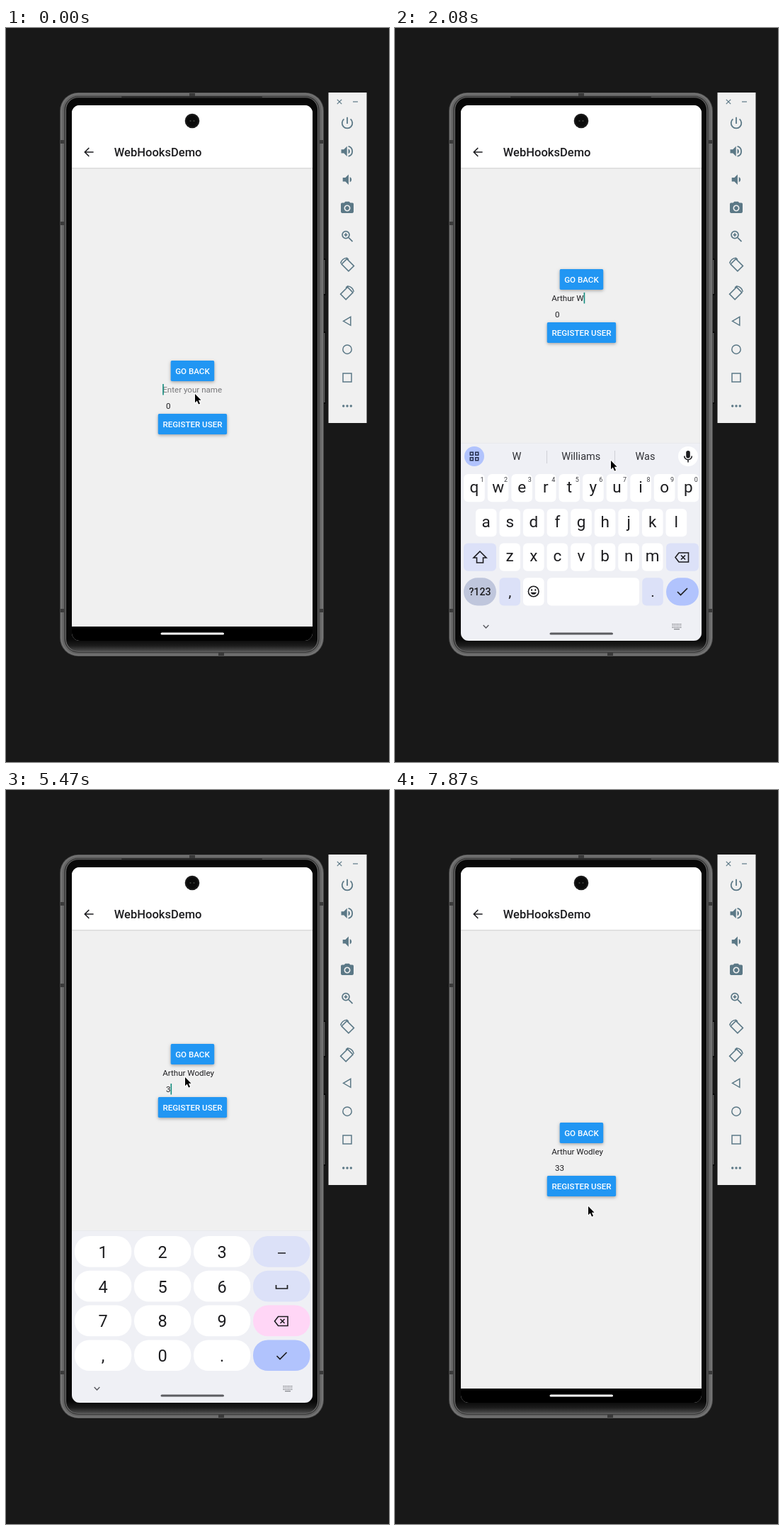
An HTML page with a canvas that plays this animation: 541x1035 px, repeating every 8 s.

```html
<!DOCTYPE html>
<html lang="en">
<head>
<meta charset="utf-8">
<title>WebHooksDemo</title>
<style>
html, body { margin: 0; width: 100%; height: 100%; overflow: hidden; background: #181818; }
canvas { display: block; width: 541px; height: 1035px; }
</style>
</head>
<body>
<canvas id="stage" width="541" height="1035"></canvas>
<script>
const ctx = document.getElementById('stage').getContext('2d');
const LOOP = 8000;
const NAME = 'Arthur Wodley';
const INK = '#1d1d20', SLATE = '#5b7886', KEY_TINT = '#dce1f8', ACCENT = '#b1c3fd';

// Held keys: [time, value...]
const POINTER = [
  [0, 267, 516], [140, 268, 518], [290, 282, 552], [440, 300, 597], [590, 305, 610],
  [3270, 304, 600], [3420, 290, 560], [3570, 265, 501], [3690, 257, 455], [3840, 254, 420],
  [3980, 253, 405], [6220, 256, 410], [6370, 268, 440], [6520, 308, 500], [6670, 385, 771],
  [6820, 390, 806], [6970, 393, 817], [7120, 392, 800], [7270, 380, 770], [7420, 345, 700],
  [7570, 308, 640], [7720, 282, 602], [7870, 273, 587]
];
const KEYBOARD_DROP = [[0, 300], [140, 220], [290, 70], [440, 10], [590, 0], [7270, 40], [7420, 150], [7570, 300]];
const FORM_SHIFT = [[0, 0], [290, -129], [4280, -111], [7420, 0]];
const AGE = [[0, '0'], [4730, ''], [5470, '3'], [5620, '33']];
const CARET = [[0, true], [3420, false], [3840, true], [6220, false], [6670, true], [7120, false]];
const HINTS = [
  [], ['A', 'Are', 'And'], ['Ar', 'Are', 'Art'], ['Art', 'Arts', 'Article'], ['Arth', 'Arthur', 'Art'],
  ['Arthu', 'Arthur', 'Art'], ['Arthur', 'Arthurs', 'Author'], ['is', 'and', 'was'], ['W', 'Williams', 'Was'],
  ['Wo', 'Would', 'Work'], ['Wod', 'Wood', 'Words'], ['Wodl', 'World', 'Would'], ['Wodle', 'Would', 'Whole'],
  ['Wodle', 'Wodley', 'Whole']
];

const held = (track, t) => track.filter(k => k[0] <= t).pop().slice(1);

function text(str, x, y, size, color = INK, align = 'left', weight = 400) {
  ctx.font = `${weight} ${size}px Roboto, sans-serif`;
  ctx.textAlign = align;
  ctx.fillStyle = color;
  ctx.fillText(str, x, y);
}

function box(x, y, w, h, r, color) {
  ctx.fillStyle = color;
  ctx.beginPath();
  ctx.roundRect(x, y, w, h, r);
  ctx.fill();
}

const disc = (x, y, r, color) => box(x - r, y - r, 2 * r, 2 * r, r, color);

// Path drawn around its own centre; width 0 means filled.
function icon(path, x, y, color, width = 0, turn = 0, flip = 1) {
  ctx.save();
  ctx.translate(x, y);
  ctx.scale(flip, 1);
  ctx.rotate(turn);
  const p = new Path2D(path);
  if (width) {
    ctx.strokeStyle = color;
    ctx.lineWidth = width;
    ctx.stroke(p);
  } else {
    ctx.fillStyle = color;
    ctx.fill(p);
  }
  ctx.restore();
}

const CHECK = 'M-7 0L-2.5 4.5L7 -5';
const circlePath = (r, x = 0, y = 0) => `M${x - r} ${y}a${r} ${r} 0 1 0 ${2 * r} 0a${r} ${r} 0 1 0 ${-2 * r} 0Z`;

function drawPhone() {
  ctx.fillStyle = '#181818';
  ctx.fillRect(0, 0, 541, 1035);
  for (const [y, h] of [[325, 52], [428, 102]]) {
    box(448, y, 3.5, h, 1, '#050505');
    box(449, y + 2, 1.5, h - 4, 0, '#5a5a5a');
  }
  const bezel = ctx.createLinearGradient(0, 862, 0, 880);
  bezel.addColorStop(0, '#080808');
  bezel.addColorStop(.5, '#1c1c1c');
  bezel.addColorStop(1, '#565656');
  const layers = [[0, '#484848'], [1, '#747474'], [3.5, '#646464'], [6.5, '#2c2c2c'], [7.8, '#6c6c6c'], [9, bezel]];
  for (const [d, color] of layers) box(76 + d, 91 + d * .8, 373 - 2 * d, 795 - 1.6 * d, 26 - d, color);
  for (const y of [160, 275, 821]) box(77, y - 2, 5, 5, 0, '#3a3a3a');
  for (const y of [160, 821]) box(443, y - 2, 5, 5, 0, '#3a3a3a');
  box(259, 92, 8, 4, 0, '#3a3a3a');
  box(300, 881, 8, 4, 0, '#3a3a3a');
  box(163, 96, 199, 2, 1, '#2a2a2a');
}

function drawToolbar() {
  box(455.5, 91, 54, 466, 0, '#f0f0f0');
  icon('M-3.2 -3.2L3.2 3.2M3.2 -3.2L-3.2 3.2', 471, 104, SLATE, 1.2);
  icon('M-3.5 0H3.5', 493.5, 104, SLATE, 1.2);
  const at = (i, path, width, turn, flip) => icon(path, 482, 134 + i * 39.9, SLATE, width, turn, flip);
  at(0, 'M0 -8.3V1M-4.6 -5.6A7.3 7.3 0 1 0 4.6 -5.6', 1.8);
  at(1, 'M-8.5 -2.7H-4.8L-.3 -7.2V7.2L-4.8 2.7H-8.5ZM1.5 -3.7A4 4 0 0 1 1.5 3.7Z');
  at(1, 'M1.6 -7A7.2 7.2 0 0 1 1.6 7', 1.8);
  at(2, 'M-6.3 -2.7H-2.6L1.9 -7.2V7.2L-2.6 2.7H-6.3ZM3.7 -3.7A4 4 0 0 1 3.7 3.7Z');
  at(3, 'M-2.7 -9H2.7L4.4 -7.2H7.3Q9 -7.2 9 -5.4V5.4Q9 7.2 7.3 7.2H-7.3Q-9 7.2 -9 5.4V-5.4Q-9 -7.2 -7.3 -7.2H-4.4Z');
  icon(circlePath(3.7), 482, 254, '#f0f0f0', 1.6);
  at(4, circlePath(5, -2, -2) + 'M1.8 1.8L7.5 7.5M-4.4 -2H.4M-2 -4.4V.4', 1.7);
  for (const [i, flip] of [[5, 1], [6, -1]]) {
    at(i, 'M-5.3 -6H5.3V8H-5.3Z', 1.6, -Math.PI / 4, flip);
    at(i, 'M-9.3 -1.5A9.3 9.3 0 0 1 -.5 -9.3L2 -7', 1.5, 0, flip);
  }
  at(7, 'M-5.5 0L4.8 -6V6Z', 1.5);
  at(8, circlePath(6.2), 1.5);
  at(9, 'M-6 -6H6V6H-6Z', 1.5);
  for (const dx of [-5.3, 0, 5.3]) disc(482 + dx, 533, 1.7, SLATE);
}

function button(label, x, y, w) {
  ctx.save();
  ctx.shadowColor = 'rgba(0,0,0,.32)';
  ctx.shadowBlur = 4;
  ctx.shadowOffsetY = 1.5;
  box(x, y, w, 29, 1.7, '#2196f3');
  ctx.restore();
  text(label, x + w / 2, y + 18.7, 11.6, '#fff', 'center', 500);
}

function field(value, hint, x, baseline, caret) {
  text(value || hint, x, baseline, 11.6, value ? INK : '#77777a');
  if (caret) box(x + (value ? ctx.measureText(value).width : 0), baseline - 12, 1.6, 15.5, 0, '#128c7e');
}

function drawApp(t, typed) {
  ctx.fillStyle = '#f0f0f0';
  ctx.fillRect(93, 109, 340, 755);
  ctx.fillStyle = '#dcdcdc';
  ctx.fillRect(93, 197, 340, 1.5);
  ctx.fillStyle = '#fff';
  ctx.fillRect(93, 109, 340, 88);
  icon('M6.6 0H-6M.3 -6L-5.7 0L.3 6', 117, 175, INK, 1.6);
  text('WebHooksDemo', 152.8, 181, 16.55, INK, 'left', 500);
  disc(263, 131, 10.3, '#1a1a1a');
  disc(263, 131, 8, '#0b0b0b');
  for (const x of [260.5, 265.5]) disc(x, 131, 1.1, '#3c403c');

  const caret = held(CARET, t)[0], onAge = t >= 4280;
  ctx.save();
  ctx.translate(0, held(FORM_SHIFT, t)[0]);
  button('GO BACK', 232.7, 469, 61.5);
  field(typed, 'Enter your name', 221.2, 514, caret && !onAge);
  field(held(AGE, t)[0], 'Enter your age', 226, 537, caret && onAge);
  button('REGISTER USER', 214.8, 544, 97.3);
  ctx.restore();

  ctx.fillStyle = '#000';
  ctx.fillRect(93, 844, 340, 20);
}

function deleteIcon(x, y) {
  icon('M-9.5 0L-4.5 -6.5H9V6.5H-4.5ZM-1.5 -3L4.5 3M4.5 -3L-1.5 3', x, y, INK, 1.6);
}

function drawBase(top) {
  ctx.fillStyle = '#eff0f5';
  ctx.fillRect(93, top, 340, 900 - top);
  ctx.fillStyle = '#e8e9ed';
  ctx.fillRect(93, top, 340, 1);
  icon('M-3.8 -2L0 2L3.8 -2', 128.5, 844, '#55565c', 1.3);
  for (let r = 0; r < 3; r++)
    for (let c = 0; c < 6; c++) box(391.5 + c * 2.3, 840 + r * 2.4, 1.2, 1.2, 0, '#66676d');
  box(394, 847.3, 8, 1, 0, '#66676d');
}

function drawHints(words) {
  disc(112, 604, 14, ACCENT);
  for (const dx of [-3.7, 3.7])
    for (const dy of [-3.7, 3.7])
      icon('M-2 -2H2V2H-2Z', 112 + dx, 604 + dy, '#27304f', 1.5);
  disc(414, 604, 14, '#fff');
  box(411.2, 596, 5.6, 10.5, 2.8, INK);
  icon('M-5.3 -.5A5.3 5.3 0 0 0 5.3 -.5M0 5V8.5', 414, 604, INK, 1.6);
  words.forEach((word, i) => text(word, words.length === 1 ? 262 : 172 + i * 90.7, 609, 14.5, '#303136', 'center'));
  if (words.length > 1) for (const x of [214, 310]) box(x, 596, 1, 18, 0, '#cfd0d7');
}

function drawLetters(caps) {
  const rows = [['qwertyuiop', 112, 629], ['asdfghjkl', 128.7, 678], ['zxcvbnm', 162.2, 726.5]];
  for (const [letters, start, y] of rows)
    [...letters].forEach((ch, i) => {
      const x = start + i * 33.58;
      box(x - 14.8, y, 29.6, 39.3, 6, '#fff');
      text(caps ? ch.toUpperCase() : ch, x, y + 25.5, 22.5, INK, 'center');
      if (y === 629) text((i + 1) % 10, x + 11, 640, 9, '#3c3d42', 'center');
    });

  box(97, 726.5, 46, 39.3, 6, KEY_TINT);
  const shift = 'M0 -8.5L9 .5H4.5V7.5H-4.5V.5H-9Z';
  icon(shift, 120, 746.5, INK, 1.6);
  if (caps) icon(shift, 120, 746.5, INK);
  box(383, 726.5, 46, 39.3, 6, KEY_TINT);
  deleteIcon(405.5, 746.5);

  box(97, 775.3, 46, 39.3, 19.6, '#bfc6dc');
  text('?123', 120, 799.5, 14.2, INK, 'center', 500);
  for (const [ch, x] of [[',', 162.2], ['.', 364]]) {
    box(x - 14.8, 775.3, 29.6, 39.3, 6, KEY_TINT);
    text(ch, x, 802, 21, INK, 'center');
  }
  box(181, 775.3, 29.6, 39.3, 6, '#fff');
  icon(circlePath(7.3), 195.7, 794.5, INK, 1.6);
  icon(circlePath(1.2, -2.6, -2) + circlePath(1.2, 2.6, -2) + 'M-4.2 1.2H4.2A4.4 4.4 0 0 1 -4.2 1.2Z', 195.7, 794.5, INK);
  box(215, 775.3, 130, 39.3, 6, '#fff');
  box(383, 775.3, 46, 39.3, 19.6, ACCENT);
  icon(CHECK, 406, 795, INK, 1.7);
}

function drawNumbers() {
  const tints = [KEY_TINT, KEY_TINT, '#ffd6f6', ACCENT];
  ['123', '456', '789', ',0.'].forEach((row, r) => {
    const y = 629 + r * 48.8, mid = y + 22;
    [...row].forEach((ch, c) => {
      box(97 + c * 84, y, 80.3, 43.7, 21, '#fff');
      text(ch, 137 + c * 84, mid + 8.8, 23.5, INK, 'center');
    });
    box(349, y, 80.5, 43.7, 21, tints[r]);
  });
  icon('M-5.5 0H5.5', 389.5, 653, INK, 1.7);
  icon('M-8 -2.5V2.5H8V-2.5', 389.5, 700.5, INK, 1.7);
  deleteIcon(389, 749);
  icon(CHECK, 389.5, 798, INK, 1.7);
}

function drawKeyboard(t, count) {
  const numeric = t >= 4280;
  drawBase(numeric ? 621 : 585);
  if (numeric) return drawNumbers();
  drawHints(t >= 2970 ? [NAME.split(' ')[1]] : HINTS[count]);
  drawLetters(count === 0);
}

function drawPointer(t) {
  const [x, y] = held(POINTER, t);
  const arrow = 'M0 0V12.2L2.8 9.6L5 14.6L7 13.7L4.9 8.8H8.6Z';
  icon(arrow, x, y, '#fff', 1.8);
  icon(arrow, x, y, '#000');
}

function render(t) {
  const count = t < 1040 ? 0 : Math.min(NAME.length, 1 + Math.floor((t - 1040) / 147.4));
  const drop = held(KEYBOARD_DROP, t)[0];
  const open = drop < 300;

  drawPhone();
  drawToolbar();
  ctx.save();
  ctx.beginPath();
  ctx.roundRect(93, 109, 340, 755, 11);
  ctx.clip();
  drawApp(t, NAME.slice(0, count));
  if (open) {
    ctx.save();
    ctx.translate(0, drop);
    drawKeyboard(t, count);
    ctx.restore();
  }
  box(218.5, 852.4, 89.5, 3.2, 1.6, open ? '#5c5d61' : '#fff');
  ctx.restore();
  drawPointer(t);
}

const start = performance.now();
function tick(now) {
  render(Math.max(0, now - start) % LOOP);
  requestAnimationFrame(tick);
}
render(0);
requestAnimationFrame(tick);
</script>
</body>
</html>
```
